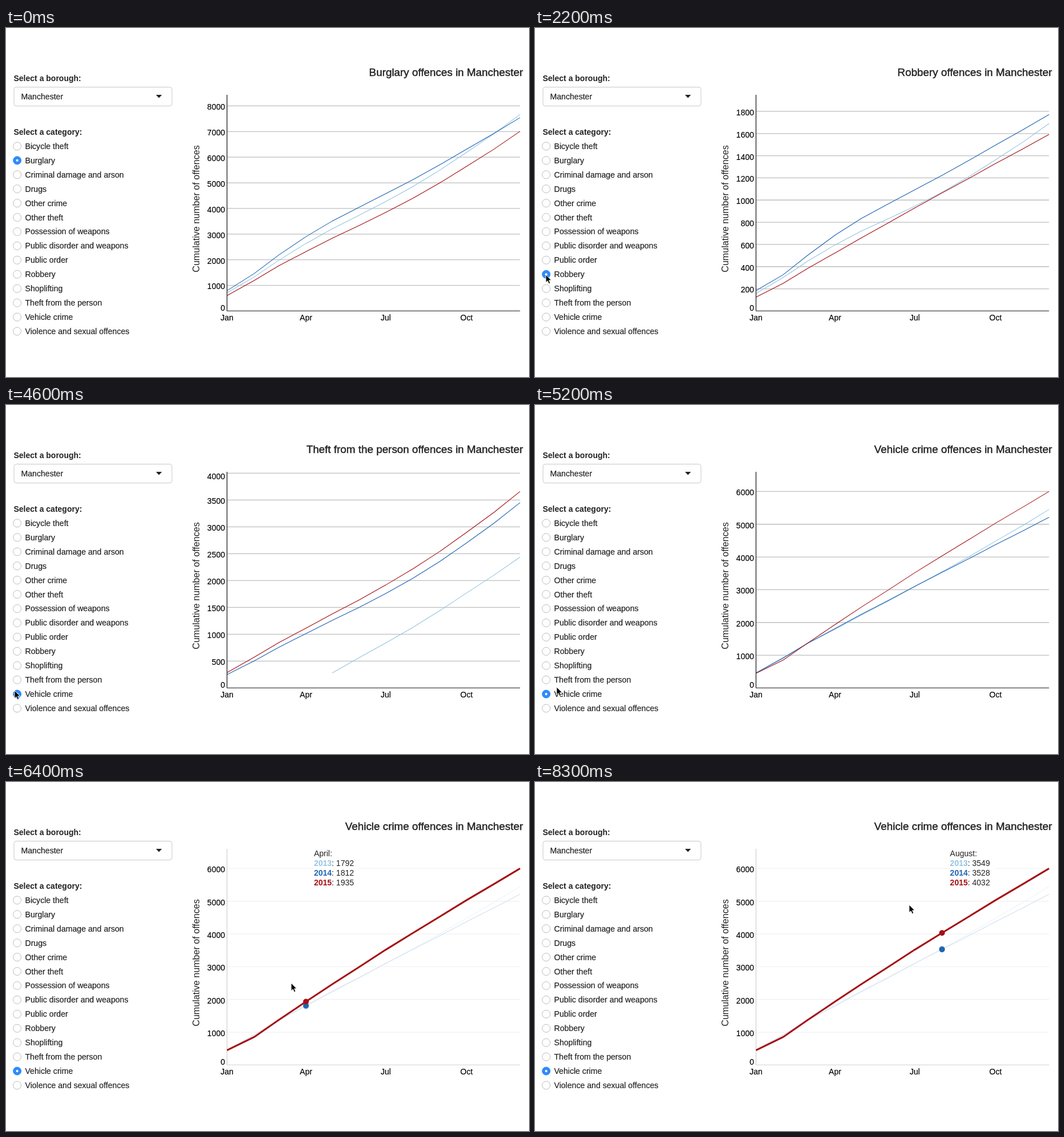
An HTML page for the animation above (8.4 s loop, 917x611 px).

```html
<!DOCTYPE html>
<html lang="en">
<head>
<meta charset="utf-8">
<title>Offences by category</title>
<style>
html, body { margin: 0; width: 100%; height: 100%; overflow: hidden; background: #fff; }
svg { display: block; width: 100%; height: 100%; }
text { font: 14px "Liberation Sans", Arial, sans-serif; fill: #222; }
.label { font-size: 14.1px; stroke: #222; stroke-width: .2px; }
.tick { fill: #000; stroke: #000; stroke-width: .15px; }
.bold { font-weight: 700; }
.title { font-size: 18.85px; stroke: #222; stroke-width: .45px; }
.name { font-size: 16.1px; }
</style>
</head>
<body>
<svg id="stage" viewBox="0 0 917 611">
  <g id="form"></g>
  <g id="chart"></g>
  <path id="cursor" d="M0 0V13.6L3.1 10.7L5.3 15.7L7.7 14.6L5.6 9.8H9.8Z" fill="#000" stroke="#fff" stroke-width=".9"/>
</svg>
<script>
const LOOP = 8400, STEP = 100;
const LEFT = 387.5, RIGHT = 901.3, TOP = 117, BASE = 495.4;
const COLORS = ['#94c5e3', '#1f65b4', '#a51014'];
const YEARS = [2013, 2014, 2015];
const MONTHS = ['January', 'February', 'March', 'April', 'May', 'June', 'July',
  'August', 'September', 'October', 'November', 'December'];
const CATEGORIES = ['Bicycle theft', 'Burglary', 'Criminal damage and arson', 'Drugs',
  'Other crime', 'Other theft', 'Possession of weapons', 'Public disorder and weapons',
  'Public order', 'Robbery', 'Shoplifting', 'Theft from the person', 'Vehicle crime',
  'Violence and sexual offences'];

// each row gives totals at the KEYS months; the rest is a smooth curve
const KEYS = [0, 1, 3, 7, 11];
const CHARTS = {
  Burglary: { step: 1000, rows: [
    [713, 1326, 2630, 4858, 7667], [791, 1460, 2897, 5126, 7544], [602, 1192, 2318, 4402, 7009]] },
  Robbery: { step: 200, rows: [
    [158, 302, 595, 1071, 1690], [184, 327, 683, 1223, 1772], [124, 250, 523, 1064, 1592]] },
  // negative totals lie before the first record and are not drawn
  'Theft from the person': { step: 500, rows: [
    [-1400, -900, -60, 1130, 2437], [248, 503, 1013, 2044, 3452], [285, 572, 1114, 2219, 3660]] },
  'Vehicle crime': { step: 1000, rows: [
    [466, 932, 1792, 3549, 5450], [455, 914, 1812, 3528, 5215], [449, 855, 1935, 4032, 6000]] }
};

const PICKS = [[0, 'Burglary'], [2000, 'Robbery'], [3200, 'Theft from the person'], [4500, 'Vehicle crime']];
const LAG = 200;
const HOVER = 5650, FADE = 300;
// each hop: start, end, x, y
const HOPS = [[1300, 1900, 19, 432], [2700, 3100, 15, 476], [4000, 4350, 15, 500],
  [5100, 5800, 428, 386], [5800, 6400, 500, 352], [6400, 8300, 656, 215]];

const $ = id => document.getElementById(id);
const clamp = (v, a, b) => Math.min(b, Math.max(a, v));
const dayOf = m => Date.UTC(2015, m, 1) - Date.UTC(2015, 0, 1);
const monthX = m => LEFT + dayOf(m) / dayOf(11) * (RIGHT - LEFT);
const text = (x, y, s, more = '') => `<text x="${x}" y="${y}" ${more}>${s}</text>`;
const line = (x1, y1, x2, y2, color, w) =>
  `<path d="M${x1} ${y1}L${x2} ${y2}" stroke="${color}" stroke-width="${w}"/>`;
const pickAt = t => PICKS.filter(p => p[0] <= t).pop()?.[1] ?? PICKS[0][1];

function cursorAt(t) {
  let x = -20, y = 470;
  for (const [from, to, hx, hy] of HOPS) {
    let u = clamp((t - from) / (to - from), 0, 1);
    if (from < HOVER) u = u * u * (3 - 2 * u);
    x += (hx - x) * u;
    y += (hy - y) * u;
  }
  return [x, y];
}

// cubic curve through the key totals
function totalAt(row, m) {
  const gap = i => KEYS[i + 1] - KEYS[i];
  const rise = i => (row[i + 1] - row[i]) / gap(i);
  const end = KEYS.length - 1;
  const slope = i => i === 0 ? 2 * rise(0) - slope(1)
    : i === end ? 2 * rise(end - 1) - slope(end - 1)
    : (gap(i) * rise(i - 1) + gap(i - 1) * rise(i)) / (gap(i - 1) + gap(i));
  const i = Math.max(0, KEYS.findIndex(k => k >= m) - 1);
  const h = gap(i), u = (m - KEYS[i]) / h, w = 1 - u;
  return Math.round(row[i] * w * w * (1 + 2 * u) + row[i + 1] * u * u * (1 + 2 * w)
    + h * u * w * (slope(i) * w - slope(i + 1) * u));
}

function drawForm(picked) {
  let out = text(13.5, 93, 'Select a borough:', 'class="bold"')
    + '<rect x="14" y="103.5" width="277" height="33" rx="4" fill="#fff" stroke="#c8c8c8"/>'
    + text(26.5, 125, 'Manchester', 'class="label"')
    + '<path d="M263 117H273.4L268.2 122.6Z" fill="#222"/>'
    + text(13.5, 187, 'Select a category:', 'class="bold"');
  CATEGORIES.forEach((name, i) => {
    const y = 206.9 + i * 24.93, on = name === picked;
    out += `<circle cx="19.6" cy="${y}" r="7" fill="${on ? '#2f8bfa' : '#fff'}" stroke="${on ? '#2f8bfa' : '#bcbcbc'}"/>`;
    if (on) out += `<circle cx="19.6" cy="${y}" r="2.1" fill="#fff"/>`;
    out += text(33.5, y + 5, name, 'class="label"');
  });
  return out;
}

function drawChart(name, hover) {
  const { step, rows } = CHARTS[name];
  const totals = rows.map(row => MONTHS.map((_, m) => totalAt(row, m)));
  const limit = 1.1 * Math.max(...totals.flat());
  const y = v => BASE - v / limit * (BASE - TOP);
  const series = (k, w) => {
    const pts = totals[k].map((v, m) => v < 0 ? '' : `${monthX(m).toFixed(1)},${y(v).toFixed(1)}`);
    return `<polyline points="${pts.join(' ').trim()}" fill="none" stroke="${COLORS[k]}" stroke-width="${w}"/>`;
  };
  let out = '', labels = '';
  for (let v = 0; v <= limit; v += step) {
    if (v) out += line(LEFT, y(v), RIGHT, y(v), '#bebebe', 1.3);
    labels += text(384, clamp(y(v) + 1.9, 125, 490) + 5, v, 'class="tick" text-anchor="end"');
  }
  for (let k = 0; k < 3; k++) out += series(k, 1.1);
  out += line(LEFT, TOP, LEFT, BASE, '#222', 1.3) + line(LEFT, BASE, RIGHT, BASE, '#444', 1.4);

  if (hover) {
    const { month, fade } = hover, x = monthX(month);
    const values = totals.map(r => r[month]);
    out += `<rect x="386" y="115" width="517" height="382" fill="#fff" opacity="${.8 * fade}"/>`
      + series(values.indexOf(Math.max(...values)), 3);
    values.forEach((v, k) => out += `<circle cx="${x}" cy="${y(v)}" r="5" fill="${COLORS[k]}"/>`);
    out += `<rect x="${x + 14}" y="117" width="80" height="68" fill="#fff"/>`
      + text(x + 14, 130, MONTHS[month] + ':');
    values.forEach((v, k) => out += text(x + 14, 147 + 17 * k,
      `<tspan class="bold" fill="${COLORS[k]}">${YEARS[k]}</tspan>: ${v}`));
  }
  for (let m = 0; m < 12; m += 3)
    labels += text(monthX(m), 512, MONTHS[m].slice(0, 3), 'class="tick" text-anchor="middle"');
  return out + labels
    + text(906.5, 84, name + ' offences in Manchester', 'class="title" text-anchor="end"')
    + text(0, 0, 'Cumulative number of offences',
      'class="name" text-anchor="middle" transform="translate(339 316.5) rotate(-90)"');
}

function hoverAt(t, x) {
  if (t < HOVER) return null;
  const reach = x + (x - LEFT) * .2;
  let month = 0;
  for (let m = 1; m < 12; m++)
    if (Math.abs(monthX(m) - reach) < Math.abs(monthX(month) - reach)) month = m;
  return { month, fade: clamp((t - HOVER) / FADE, 0, 1) };
}

function render(t) {
  const [x, y] = cursorAt(t);
  $('form').innerHTML = drawForm(pickAt(t));
  $('chart').innerHTML = drawChart(pickAt(t - LAG), hoverAt(t, x));
  $('cursor').setAttribute('transform', `translate(${x.toFixed(1)} ${y.toFixed(1)})`);
}

const start = performance.now();
let last = -1;
function tick() {
  const t = Math.floor((performance.now() - start) % LOOP / STEP) * STEP;
  if (t !== last) render(last = t);
  requestAnimationFrame(tick);
}
tick();
</script>
</body>
</html>
```
